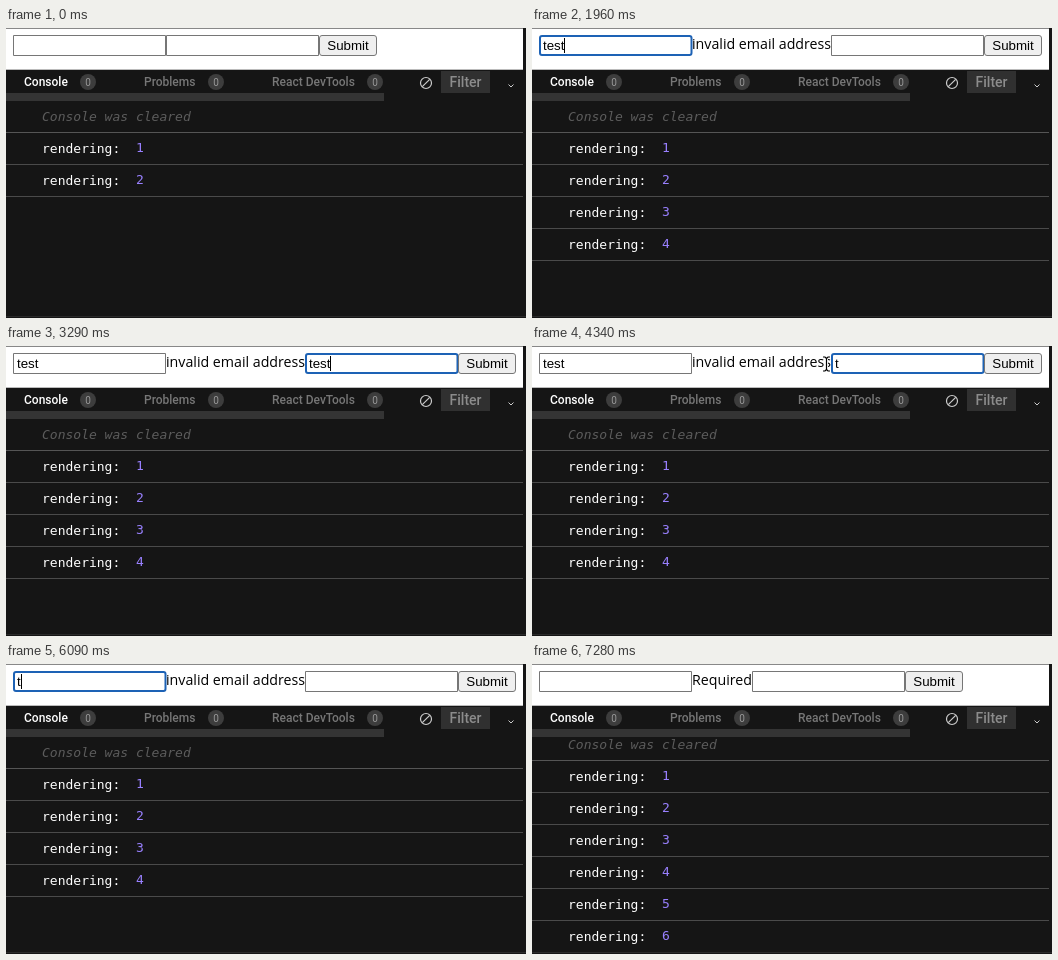
Write an HTML page with a canvas that moves like this. It is 520 px wide and 290 px high and loops after 7350 ms.

```html
<!DOCTYPE html>
<html lang="en">
<head>
<meta charset="utf-8">
<title>Form rendering log</title>
<style>
html, body { margin: 0; width: 100%; height: 100%; overflow: hidden; background: #151515; }
canvas { display: block; }
</style>
</head>
<body>
<canvas id="stage" width="520" height="290"></canvas>
<script>
const ctx = document.getElementById('stage').getContext('2d');
const LOOP = 7350, STEP = 70;
const ARIAL = '13.333px "Liberation Sans", Arial, sans-serif';
const MONO = '13px "DejaVu Sans Mono", monospace';
const UI = '500 12px Roboto, sans-serif';

// Each track lists [start time, value]; a value holds until the next entry.
const emailTrack = [[0, ''], [1470, 't'], [1680, 'te'], [1820, 'tes'], [1960, 'test'],
  [5390, 'tes'], [5600, 'te'], [5810, 't'], [6160, '']];
const secondTrack = [[0, ''], [2800, 't'], [3010, 'te'], [3150, 'tes'], [3290, 'test'],
  [3850, 'tes'], [4130, 'te'], [4270, 't'], [4410, '']];
const errorTrack = [[0, ''], [1540, 'invalid email address'], [6160, 'Required']];
const focusTrack = [[0, 0], [1190, 1], [2520, 2], [5040, 1], [7280, 0]];
const caretTrack = [[0, true], [3920, false], [5040, true], [5600, false],
  [6090, true], [6650, false], [7140, true]];
const rowsTrack = [[0, 2], [1540, 4], [6160, 5], [6230, 6]];
const secondX = { '': 160, 'invalid email address': 299, 'Required': 220 };

// Pointer strokes: visible until `end`, moving along [time, x, y] points.
const strokes = [
  { end: 1470, path: [[210, 200, 197], [280, 172, 150], [350, 118, 88], [420, 62, 40], [490, 44, 21],
    [630, 44, 21], [700, 41, 13], [770, 41, 13], [840, 58, 15], [910, 65, 15]] },
  { end: 2800, path: [[2030, 66, 15], [2100, 122, 8], [2170, 220, 6], [2310, 332, 8],
    [2380, 332, 8], [2450, 334, 12], [2520, 334, 16]] },
  { end: 5390, path: [[4270, 328, 17], [4340, 294, 18], [4550, 238, 20], [4760, 172, 17],
    [4970, 129, 15], [5110, 129, 15], [5180, 128, 14]] },
  { end: 6930, path: [[6440, 128, 14], [6510, 150, 80], [6580, 176, 190], [6650, 154, 278],
    [6790, 154, 278], [6860, 155, 279]] },
];

const at = (track, t) => track.findLast(([start]) => start <= t)[1];

function pointerAt(t) {
  const stroke = strokes.find(s => t >= s.path[0][0] && t < s.end);
  if (!stroke) return null;
  const i = stroke.path.findLastIndex(p => p[0] <= t);
  const [t0, x0, y0] = stroke.path[i];
  const [t1, x1, y1] = stroke.path[i + 1] || [t0 + 1, x0, y0];
  const k = (t - t0) / (t1 - t0);
  return { x: Math.round(x0 + (x1 - x0) * k), y: Math.round(y0 + (y1 - y0) * k) };
}

function rect(x, y, w, h, color) {
  ctx.fillStyle = color;
  ctx.fillRect(x, y, w, h);
}

function text(str, x, y, font, color, align = 'left') {
  ctx.font = font;
  ctx.fillStyle = color;
  ctx.textAlign = align;
  ctx.fillText(str, x, y);
}

function line(points, color, width) {
  ctx.beginPath();
  points.forEach(([x, y]) => ctx.lineTo(x, y));
  ctx.strokeStyle = color;
  ctx.lineWidth = width;
  ctx.stroke();
}

function box(x, y, w, h, radius, color, width, fill) {
  ctx.beginPath();
  ctx.roundRect(x, y, w, h, radius);
  if (fill) {
    ctx.fillStyle = fill;
    ctx.fill();
  }
  ctx.strokeStyle = color;
  ctx.lineWidth = width;
  ctx.stroke();
}

function drawInput(x, value, focused, caret, pointer) {
  const hovered = pointer && pointer.x >= x && pointer.x < x + 153 && pointer.y > 13 && pointer.y < 28;
  if (focused) box(x + 1, 8, 151.5, 19, 2, '#1d62b5', 2, '#fff');
  else box(x + .5, 7.5, 152, 20, 0, hovered ? '#4f4f4f' : '#767676', 1, '#fff');
  text(value, x + 4, 22, ARIAL, '#000');
  if (focused && caret) rect(Math.round(x + 4 + ctx.measureText(value).width), 10, 1, 15, '#000');
}

function drawForm(t, pointer) {
  rect(0, 0, 517, 41, '#fff');
  rect(0, 0, 517, 1, '#888');
  rect(0, 41, 517, 1, '#bbb');
  const error = at(errorTrack, t), focus = at(focusTrack, t), caret = at(caretTrack, t);
  const x2 = secondX[error];
  drawInput(7, at(emailTrack, t), focus === 1, caret, pointer);
  text(error, 160, 21, '14.2px "Open Sans", sans-serif', '#000');
  drawInput(x2, at(secondTrack, t), focus === 2, caret, pointer);
  box(x2 + 153.5, 7.5, 57, 20, 2.5, '#767676', 1, '#efefef');
  text('Submit', x2 + 182, 22, ARIAL, '#000', 'center');
}

function drawTab(label, x, badgeX, color) {
  text(label, x, 58, UI, color);
  ctx.beginPath();
  ctx.arc(badgeX, 54, 8, 0, 7);
  ctx.fillStyle = '#3d3d3d';
  ctx.fill();
  text('0', badgeX, 57.5, '10px Roboto, sans-serif', '#999', 'center');
}

function drawConsole(t) {
  const rows = at(rowsTrack, t);
  ctx.save();
  ctx.beginPath();
  ctx.rect(0, 73, 517, 217);
  ctx.clip();
  ctx.translate(0, rows === 6 ? -8 : 0);
  text('Console was cleared', 36, 93, 'italic ' + MONO, '#5c5c5c');
  rect(0, 104, 517, 1, '#555');
  for (let i = 1; i <= rows; i++) {
    const y = 93 + 32 * i;
    text('rendering:', 36, y, MONO, '#fff');
    text(i, 130, y - 1, MONO, '#9980ff');
    rect(0, y + 11, 517, 1, '#4a4a4a');
  }
  ctx.restore();
  rect(0, 288, 520, 1, '#2a2a2a');

  rect(0, 65, 378, 8, '#343434');
  drawTab('Console', 18, 82, '#fff');
  drawTab('Problems', 138, 210, '#777');
  drawTab('React DevTools', 266, 369, '#777');
  box(414.5, 49.5, 11, 11, 5.5, '#ccc', 1.2);
  line([[416.3, 58.7], [423.7, 51.3]], '#ccc', 1.2);
  rect(435, 43, 49, 22, '#303030');
  text('Filter', 459.5, 59, '500 14px Roboto, sans-serif', '#8c8c8c', 'center');
  line([[502.5, 56.5], [505, 59], [507.5, 56.5]], '#ccc', 1);
}

function drawPointer({ x, y }) {
  ctx.save();
  ctx.translate(x, y);
  if (y > 5 && y < 20) {
    for (const [color, width] of [['#fff', 3], ['#000', 1.2]]) {
      line([[.5, -6], [.5, 6]], color, width);
      line([[-3, -7], [-1, -7], [.5, -5.5], [2, -7], [4, -7]], color, width);
      line([[-3, 7], [-1, 7], [.5, 5.5], [2, 7], [4, 7]], color, width);
    }
  } else {
    ctx.beginPath();
    for (const [px, py] of [[0, 0], [0, 14], [3, 11], [5.5, 16], [7.5, 15], [5.3, 10], [10, 10]]) ctx.lineTo(px, py);
    ctx.closePath();
    ctx.fillStyle = '#000';
    ctx.fill();
    ctx.strokeStyle = '#fff';
    ctx.lineWidth = 1;
    ctx.stroke();
  }
  ctx.restore();
}

function draw(now) {
  const t = Math.floor((now % LOOP) / STEP) * STEP;
  const pointer = pointerAt(t);
  rect(0, 0, 520, 290, '#151515');
  drawForm(t, pointer);
  drawConsole(t);
  if (pointer) drawPointer(pointer);
}

const start = performance.now();
function tick() {
  draw(performance.now() - start);
  requestAnimationFrame(tick);
}
tick();
</script>
</body>
</html>
```
